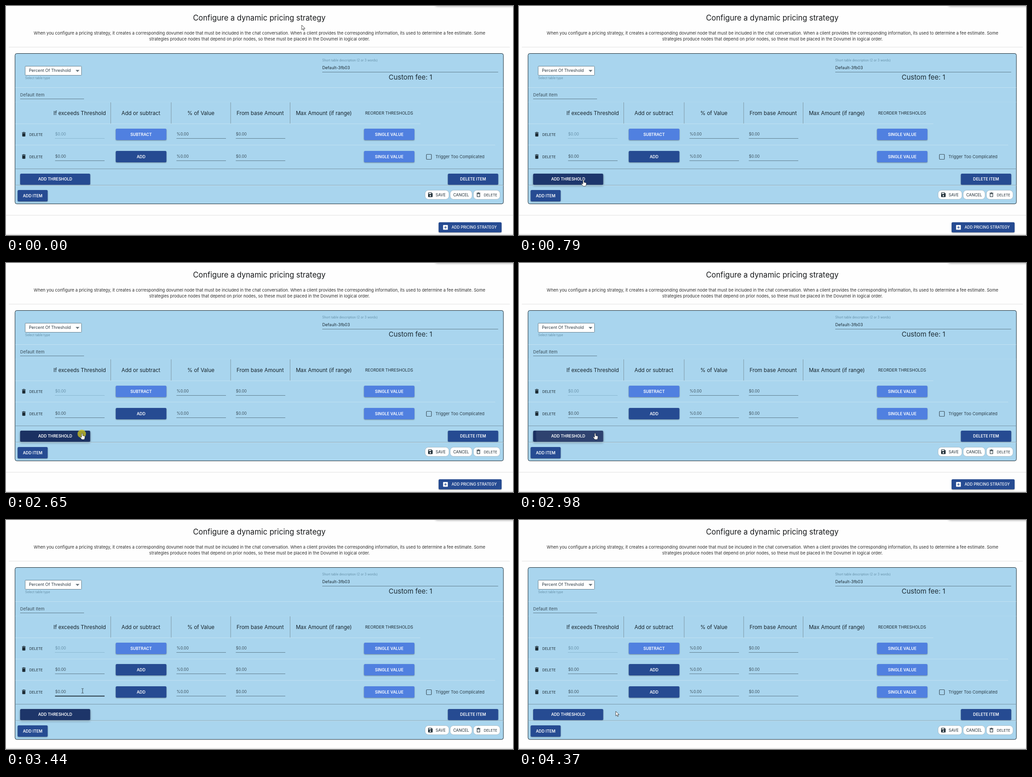
An HTML page for the animation above (4440 ms loop, 1111 by 504 pixels).

```html
<!DOCTYPE html>
<html lang="en">
<head>
<meta charset="utf-8">
<title>Pricing strategy</title>
<style>
html, body { margin: 0; width: 100%; height: 100%; overflow: hidden; background: #fff; }
svg { display: block; width: 100vw; height: 100vh; }
text { font-family: Inter, "Open Sans", sans-serif; font-optical-sizing: none; white-space: pre; }
.raised { filter: drop-shadow(0 1.2px 1.2px rgba(0, 0, 0, .38)); }
.hovered { filter: drop-shadow(0 2px 2px rgba(0, 0, 0, .45)); }
</style>
</head>
<body>
<svg id="stage" viewBox="0 0 1111 504" xmlns="http://www.w3.org/2000/svg"></svg>
<script>
(() => {
const LOOP = 4440, STEP = 66.27, GROWTH = 47;
const INK = '#1d2c35', FIELD = '#3c505c', MUTED = '#6590a8', RULE = '#5f7d8e', PALE = '#c3e2f2';
const BLUE = '#264b92', LIGHT = '#5080e0', CARD = '#a9d5ee';

// Markup helpers
const label = (x, y, size, str, fill = INK, anchor = 'start', weight = 400) =>
  `<text x="${x}" y="${y}" font-size="${size}" fill="${fill}" text-anchor="${anchor}" font-weight="${weight}">${str}</text>`;
const box = (x, y, w, h, fill, r = 0, extra = '') =>
  `<rect x="${x}" y="${y}" width="${w}" height="${h}" rx="${r}" fill="${fill}" ${extra}/>`;
const hline = (x1, x2, y, color, extra = '') =>
  `<path d="M${x1} ${y}H${x2}" stroke="${color}" fill="none" ${extra}/>`;
const button = (x, y, w, h, str, fill, extra = '') =>
  box(x, y, w, h, fill, 2.5, `class="raised" ${extra}`) +
  label(x + w / 2, y + h / 2 + 3.2, 8.75, str, '#fff', 'middle', 600);
const chip = (x, w, content) =>
  box(x, 405.5, w, 20, '#fff', 7.5, 'stroke="#9fb4c0" stroke-width=".8"') + content;
const bin = (x, y, open) =>
  `<g transform="translate(${x} ${y})"><path d="M0 .9H2.2L2.8 .2H5.2L5.8 .9H8V2.1H0Z" fill="${INK}"/>` +
  (open
    ? `<path d="M1.1 3V9.4H6.9V3Z" fill="none" stroke="${INK}" stroke-width="1.1"/>`
    : `<path d="M.6 2.9H7.4V9.2Q7.4 10.2 6.4 10.2H1.6Q.6 10.2 .6 9.2Z" fill="${INK}"/>`) + '</g>';

const field = (x, str, off) =>
  label(x + .3, 2.9, 8.5, str, off ? MUTED : FIELD) +
  hline(x, x + 108.5, 9, off ? '#6d9ab2' : RULE, off ? 'stroke-dasharray="1 1"' : '');

const row = (y, first) =>
  `<g transform="translate(0 ${y})">` +
  bin(35, -5.4) + label(51, 3, 7.9, 'DELETE') +
  field(107.5, '$0.00', first) +
  button(240.5, -12.5, 111, 25, first ? 'SUBTRACT' : 'ADD', first ? LIGHT : BLUE) +
  field(373.5, '%0.00') + field(503.5, '$0.00') +
  button(784.5, -12.5, 110.5, 25, 'SINGLE VALUE', LIGHT) + '</g>';

const headers = [[161.5, 'If exceeds Threshold'], [295.5, 'Add or subtract'], [427, '% of Value'],
  [557, 'From base Amount'], [696.5, 'Max Amount (if range)']];

const intro = [
  'When you configure a pricing strategy, it creates a corresponding dovumel node that must be included in the chat ' +
  'conversation. When a client provides the corresponding information, its used to determine a fee estimate. Some',
  'strategies produce nodes that depend on prior nodes, so these must be placed in the Dovumel in logical order.'];

const page =
  box(0, 0, 1111, 504, '#fefefe') +
  box(941, -12, 190, 11.5, '#fff', 4, 'style="filter:drop-shadow(0 1px 2.5px rgba(0,0,0,.35))"') +
  label(555, 31.7, 16.6, 'Configure a dynamic pricing strategy', '#17191b', 'middle') +
  intro.map((s, i) => label(555.5, 62.6 + i * 12.9, 9.28, s, '#2f2f2f', 'middle')).join('') +
  hline(6, 1104, 90.5, '#e2e2e2') +
  box(19.8, 104.5, 1070.2, 331, CARD, 4, 'id="card" stroke="#1c2b34"');

const upper =
  box(42, 132.5, 123.5, 20, '#fff', 1, 'stroke="#66808f"') +
  label(50.3, 145.2, 9.1, 'Percent Of Threshold', '#2b3a44') +
  '<path d="M152.5 140.8H161L156.7 145.2Z" fill="#66737b"/>' +
  label(42, 161.3, 6.87, 'Select table type', MUTED) +
  label(693, 122.3, 6.87, 'Short table description (2 or 3 words)', MUTED) +
  label(693, 138.8, 9.1, 'Default-3fb03') +
  hline(693, 1078.5, 145.5, RULE) +
  label(886.3, 162, 14.9, 'Custom fee: 1', INK, 'middle') +
  hline(20.5, 1089.5, 179.5, PALE) +
  label(31, 198.7, 9.3, 'Default Item', FIELD) +
  hline(31, 171, 204.5, RULE) +
  hline(20.5, 1089.5, 211.5, '#b0d9ef') +
  headers.map(([x, s]) => label(x, 239.6, 11.6, s, '#16232b', 'middle')).join('') +
  label(839.5, 238.7, 9.06, 'REORDER THRESHOLDS', INK, 'middle') +
  [229.5, 362, 492.3, 622.5].map(x => `<path d="M${x} 212V259" stroke="#7f98a5"/>`).join('') +
  hline(20.5, 908, 259.2, PALE) +
  row(282.5, true) +
  hline(20.5, 1072, 306, PALE) +
  `<g id="added">${row(329.5, false)}${hline(20.5, 1072, 353, PALE)}</g>`;

const lower =
  row(331.5, false) +
  box(107.5, 339.7, 108.5, 1.7, '#15222a', 0, 'id="underline"') +
  box(921.3, 326.5, 11, 11, 'none', 1.2, 'stroke="#3d515d" stroke-width="1.2"') +
  label(941, 335, 9.2, 'Trigger Too Complicated', '#2b3d48') +
  hline(20.5, 1089.5, 358.4, '#7896a6') +
  button(31, 369, 153.5, 24.5, 'ADD THRESHOLD', BLUE, 'id="threshold"') +
  '<g clip-path="url(#face)"><circle id="ripple" cx="167" cy="376" fill="#fff"/></g>' +
  button(968.3, 369, 110.3, 24.5, 'DELETE ITEM', BLUE) +
  hline(20.5, 1089.5, 394.3, '#86a3b2') + hline(20.5, 1089.5, 395.3, '#c0dfee') +
  button(25.5, 405, 65.8, 25, 'ADD ITEM', BLUE) +
  chip(918.3, 52.4,
    `<path d="M925 411.5Q925 410.5 926 410.5H932.5L934.8 412.8V419.5Q934.8 420.5 933.8 420.5H926Q925 420.5 925 419.5Z" fill="${INK}"/>` +
    box(926.3, 411.7, 5.5, 2.2, '#fff') + '<circle cx="929.9" cy="417.5" r="1.6" fill="#fff"/>' +
    label(941.6, 418.5, 8.5, 'SAVE')) +
  chip(973.3, 48, label(997.3, 418.5, 8.6, 'CANCEL', INK, 'middle')) +
  chip(1024.3, 58.3, bin(1031.3, 410.3, true) + label(1047, 418.5, 7.9, 'DELETE')) +
  hline(0, 1111, 460.5, '#e0e0e0') +
  box(948, 476, 138, 22.3, BLUE, 2.5, 'class="raised"') +
  box(957.8, 482, 10.4, 10.4, '#fff', 1.2) +
  `<path d="M963 484.4V490M960.2 487.2H965.8" stroke="${BLUE}" stroke-width="1.2"/>` +
  label(1026, 490.2, 8.25, 'ADD PRICING STRATEGY', '#fff', 'middle', 500);

const pointers =
  '<circle id="press" cx="166" cy="376" r="9.3" fill="#d8cc1c" opacity=".72"/>' +
  '<path id="arrow" d="M0 0V10.2L2.4 8L4 11.6L5.7 10.8L4.1 7.4H7.3Z" fill="#fff" stroke="#222" stroke-width=".8" stroke-linejoin="round"/>' +
  '<path id="hand" d="M-1.2 .9Q-1.2 -.3 0 -.3T1.2 .9V5L4.6 5.7Q6.4 6.1 6.3 7.8L5.6 11.5Q5.4 13.6 3.8 13.6H.4Q-.8 13.6 -1.6 12.3L-4.2 8.7Q-4.4 7.4 -3.2 7.4L-1.2 8.8Z" fill="#fff" stroke="#222" stroke-width=".7"/>' +
  '<path id="beam" d="M-2.3 -5H-.6L0 -4.4L.6 -5H2.3M0 -4.4V4.4M-2.3 5H-.6L0 4.4L.6 5H2.3" fill="none" stroke-width=".9"/>';

const stage = document.getElementById('stage');
stage.innerHTML = '<defs><clipPath id="face"><rect x="31" y="369" width="153.5" height="24.5" rx="2.5"/></clipPath></defs>' +
  page + upper + `<g id="lower">${lower}</g>` + hline(0, 1111, 502.6, '#cfcfcf') + pointers;

const el = {};
stage.querySelectorAll('[id]').forEach(n => { el[n.id] = n; });

const ramp = (v, a, b) => Math.min(1, Math.max(0, (v - a) / (b - a)));
const smooth = u => u * u * (3 - 2 * u);
const show = (node, on) => node.setAttribute('display', on ? 'inline' : 'none');
const set = (node, attrs) => { for (const k in attrs) node.setAttribute(k, attrs[k]); };
const mix = (a, b, u) => `rgb(${a.map((v, i) => Math.round(v + (b[i] - v) * u))})`;

const path = [[0, 648, 42], [7, 110, 406.5], [8, 107, 395.5], [9, 113, 390], [15, 169.5, 376],
  [16, 169.5, 376], [20, 166.8, 375], [58, 166.8, 375], [66, 212, 421]];

function pointerAt(k) {
  const i = Math.max(1, path.findIndex(p => k <= p[0]));
  const [k0, x0, y0] = path[i - 1], [k1, x1, y1] = path[i];
  const u = smooth(ramp(k, k0, k1));
  return [x0 + (x1 - x0) * u, y0 + (y1 - y0) * u];
}

function draw(t) {
  const k = Math.min(66, Math.floor((t + 14) / STEP));
  const [x, y] = pointerAt(k);
  const grown = k >= 52;

  show(el.added, grown);
  set(el.lower, { transform: `translate(0 ${grown ? GROWTH : 0})` });
  set(el.card, { height: grown ? 331 + GROWTH + .5 : 331 });

  const hover = ramp(k, 8, 13) * (1 - ramp(k, 51.6, 54.5));
  set(el.threshold, {
    fill: mix([38, 75, 146], [27, 49, 98], hover),
    class: hover > .4 ? 'hovered' : 'raised'
  });
  set(el.ripple, {
    r: 140 * smooth(ramp(k, 40, 46)),
    opacity: .14 * ramp(k, 40, 41) * (1 - ramp(k, 43, 48))
  });
  show(el.press, k >= 40 && k <= 41);
  set(el.underline, { opacity: grown ? 1 - ramp(k, 60, 64) : 0 });

  const beam = k >= 51 && y < 388;
  const hand = k >= 9 && k < 51;
  show(el.beam, beam);
  show(el.hand, hand);
  show(el.arrow, !beam && !hand);
  set(el.beam, { stroke: grown ? '#26343d' : '#a9b7cc' });
  const node = beam ? el.beam : hand ? el.hand : el.arrow;
  const nudge = beam ? 1 : 0;
  set(node, { transform: `translate(${x + nudge} ${y + nudge})` });
}

const begin = performance.now();
function tick() {
  draw((performance.now() - begin) % LOOP);
  requestAnimationFrame(tick);
}
draw(0);
requestAnimationFrame(tick);
})();
</script>
</body>
</html>
```
